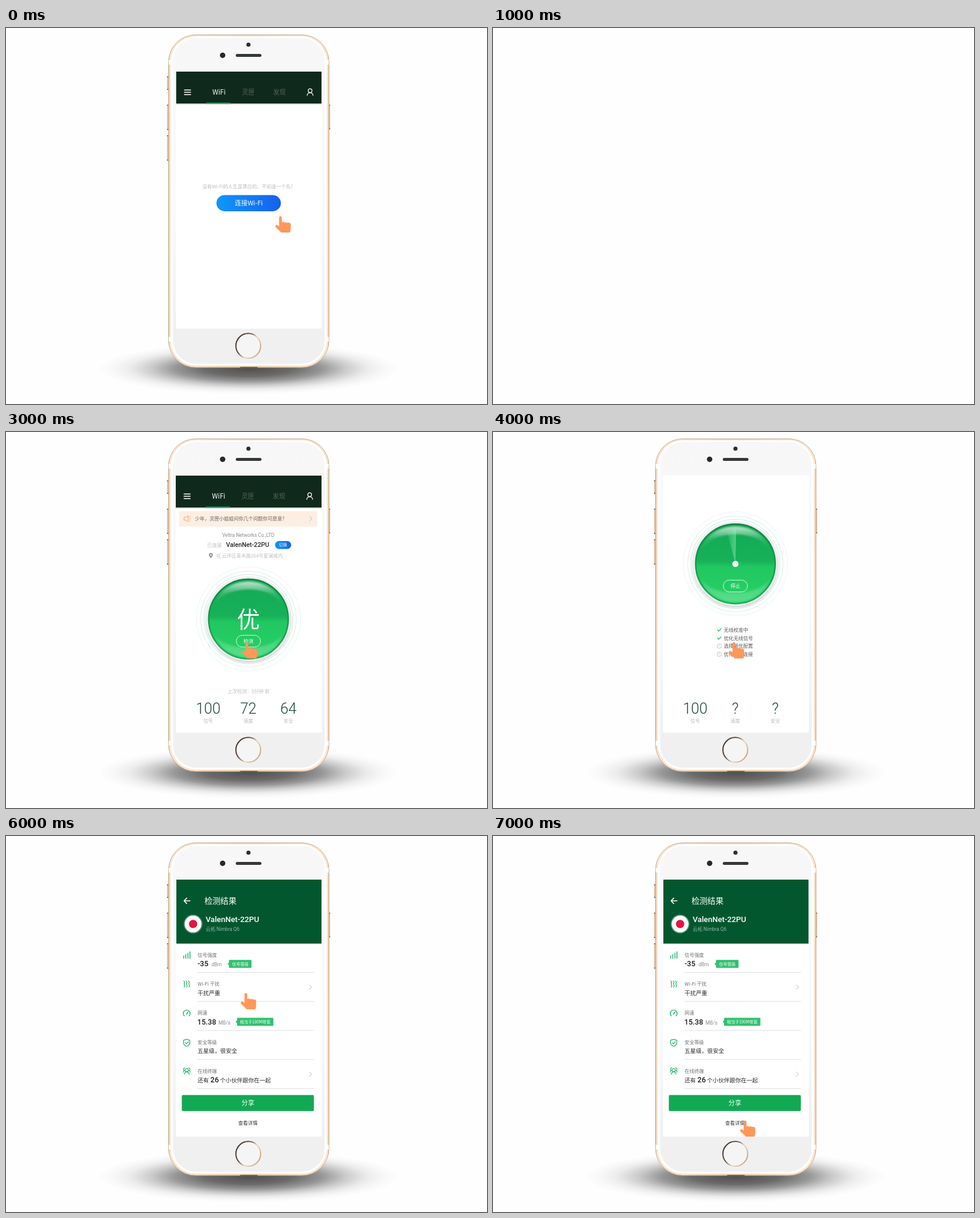
An HTML page that plays this animation: 816 by 638 pixels, repeating every 8 s.

```html
<!DOCTYPE html>
<html lang="zh-CN">
<head>
<meta charset="utf-8">
<title>Wi-Fi 检测</title>
<style>
html, body { margin: 0; width: 100%; height: 100%; overflow: hidden; background: #fefefe; }
svg { display: block; width: 100%; height: 100%; }
text { font-family: "Noto Sans CJK SC", "Noto Sans CJK", "Noto Sans", sans-serif; white-space: pre; }
.r { font-family: Roboto, "Noto Sans CJK SC", "Noto Sans CJK", sans-serif; }
.line { fill: none; stroke-linecap: round; stroke-linejoin: round; }
</style>
</head>
<body>
<svg id="stage" viewBox="0 0 816 638" xmlns="http://www.w3.org/2000/svg"></svg>
<script>
const stage = document.getElementById('stage');

const text = (x, y, size, fill, str, extra = '') =>
  `<text x="${x}" y="${y}" font-size="${size}" fill="${fill}" ${extra}>${str}</text>`;
const mid = (x, y, size, fill, str, extra = '') =>
  text(x, y, size, fill, str, 'text-anchor="middle" ' + extra);
const rect = (x, y, w, h, fill, r = 0, extra = '') =>
  `<rect x="${x}" y="${y}" width="${w}" height="${h}" rx="${r}" fill="${fill}" ${extra}/>`;
const circle = (x, y, r, fill, extra = '') =>
  `<circle cx="${x}" cy="${y}" r="${r}" fill="${fill}" ${extra}/>`;
const line = (d, color, w = 1, extra = '') =>
  `<path class="line" d="${d}" stroke="${color}" stroke-width="${w}" ${extra}/>`;
const chevron = (x, y) => line(`M${x - 1.8} ${y - 3.7}l3.7 3.7l-3.7 3.7`, '#b5b5b5', 1);
const grad = (id, dir, ...stops) => {
  const s = stops.map(([o, c, a = 1]) => `<stop offset="${o}" stop-color="${c}" stop-opacity="${a}"/>`).join('');
  const tag = dir === 'radial' ? 'radialGradient' : 'linearGradient';
  return `<${tag} id="${id}" ${dir === 'radial' ? '' : dir}>${s}</${tag}>`;
};
const ROBOTO = 'class="r"', MEDIUM = 'class="r" font-weight="500"', LIGHT = 'class="r" font-weight="300"';
const DOWN = 'x1="0" y1="0" x2="0" y2="1"', ACROSS = 'x1="0" y1="0" x2="1" y2="0"';
const SSID = 'ValenNet-22PU', GREEN = '#22b865', PALE = '#bdbdbd';

const defs = `<defs>
  ${grad('shadow', 'radial', [0, '#333', .86], [.3, '#3c3c3c', .76], [.5, '#484848', .56], [.65, '#555', .31], [.8, '#666', .12], [.92, '#777', .04], [1, '#888', .01])}
  ${grad('gold', ACROSS, [0, '#d5b291'], [.008, '#fbe6d2'], [.5, '#f0d2b3'], [.992, '#fbe6d2'], [1, '#d5b291'])}
  ${grad('face', DOWN, [0, '#f7f7f7'], [.5, '#fafafa'], [.88, '#f0f0f0'], [1, '#f0f0f0'])}
  ${grad('ring', 'x1="0" y1=".1" x2="1" y2=".7"', [0, '#3b2d27'], [.4, '#6b5446'], [.65, '#efd8c3'], [1, '#c9a17f'])}
  ${grad('blue', ACROSS, [0, '#0f97f7'], [.55, '#137af2'], [1, '#1560ee'])}
  ${grad('disc', DOWN, [0, '#12a350'], [.2, '#14ad56'], [.46, '#16b158'], [.54, '#21c861'], [1, '#28d066'])}
  ${grad('gloss', DOWN, [0, '#fff', .72], [.5, '#fff', .14], [1, '#fff', 0])}
  ${grad('glow', DOWN, [0, '#fff', 0], [1, '#8df0ae', .45])}
  ${grad('edge', DOWN, [0, '#0b8440'], [.5, '#109a4c'], [1, '#16ad55'])}
  ${grad('sweep', ACROSS, [0, '#7fe3a4', .12], [1, '#9cf0bb', .5])}
  <filter id="soft" x="-20%" y="-20%" width="140%" height="140%"><feGaussianBlur stdDeviation="1.6"/></filter>
  <clipPath id="glass"><rect x="288" y="74" width="248" height="436"/></clipPath>
</defs>`;

const side = (x, y, h) => rect(x, y, 2.6, h, '#dcc4ad', 1) +
  rect(x, y, 2.6, 1.6, '#6b5a4d') + rect(x, y + h - 1.6, 2.6, 1.6, '#6b5a4d');

const phone = `
  <ellipse cx="411.5" cy="578" rx="252" ry="43" fill="url(#shadow)"/>
  ${side(273.2, 82, 23)}${side(273.2, 130, 43)}${side(273.2, 182, 43)}${side(547.4, 130, 42)}
  ${rect(275.7, 11.5, 272.3, 564.5, 'url(#gold)', 46, 'stroke="#c9a684" stroke-width=".9"')}
  ${[54, 524].map(y => rect(276, y, 4, 8, '#fafafa') + rect(543.6, y, 4, 8, '#fafafa')).join('')}
  ${rect(279.5, 14, 264.7, 559, '#fefefe', 43)}
  ${rect(283.5, 17, 257, 552.5, 'url(#face)', 39)}
  ${rect(397, 575, 30, 1.8, '#6d5a4c', 1)}
  ${circle(411.3, 28.2, 3.5, '#2b302c')}${circle(367.5, 46.3, 4.6, '#252b27')}
  ${rect(389.8, 44, 43.6, 5, '#343936', 2.5)}
  ${circle(411, 539.3, 21, '#f5f5f5', 'stroke="url(#ring)" stroke-width="2"')}
  ${rect(288, 74, 248, 436, '#fff')}`;

const header = x => rect(x, 74, 535.3 - x, 54.3, '#10291d') +
  rect(x, 128.3, 535.3 - x, 1.4, '#c9cfcc') + rect(x + 51, 126.4, 41, 2, '#138a4f') +
  line(`M${x + 14} 105.2h10.5m-10.5 3.9h10.5m-10.5 3.9h10.5`, '#fff', 1.5) +
  mid(x + 72.8, 112.7, 11.3, '#fff', 'WiFi') +
  mid(x + 122.3, 112.7, 10.8, '#52635a', '灵匣') + mid(x + 175, 112.7, 10.8, '#52635a', '发现') +
  circle(x + 227.2, 106.3, 3.2, 'none', 'stroke="#fff" stroke-width="1.3"') +
  line(`M${x + 222.3} 114.3c0-6 9.8-6 9.8 0`, '#fff', 1.3);

const score = (x, val, label) => mid(x, 478, 25, '#174a35', val, LIGHT) + mid(x, 493.2, 8.1, PALE, label);
const scores = (a, b, c) => score(343, a, '信号') + score(411, b, '速度') + score(479, c, '安全');

// Glossy round button, centred on y, with a label pill below the middle
const dial = (y, label, inner) => `<g transform="translate(411.3 ${y})">
  ${[[88.3, '#e4f6ec'], [81, '#d3f0df'], [75.6, '#c9e9d6']].map(([r, c]) => circle(0, 0, r, 'none', `stroke="${c}" stroke-width=".9"`)).join('')}
  ${circle(0, 1.5, 72.5, '#cfd3d1', 'filter="url(#soft)"')}${circle(0, 0, 71.8, '#eef0ef')}
  ${circle(0, 0, 67.5, 'url(#disc)', 'stroke="url(#edge)" stroke-width="2.4"')}
  <path d="M-57-23C-47-77 47-77 57-23C42-59-42-59-57-23Z" fill="url(#gloss)" filter="url(#soft)"/>
  <path d="M-60 22C-44 79 44 79 60 22C43 58-43 58-60 22Z" fill="url(#glow)" filter="url(#soft)"/>
  ${inner}
  ${rect(-20.6, 27.6, 41, 20, 'none', 10, 'stroke="#d9f8e4" stroke-width="1"')}
  ${mid(0, 40.7, 8.3, '#fff', label)}</g>`;

const connect = header(288.7) +
  text(333, 271.5, 8.2, '#bcbcbc', '没有Wi-Fi的人生是黑白的，不如连一个先?') +
  rect(357, 283.4, 109.3, 27.5, 'url(#blue)', 13.75) +
  mid(411.7, 301.2, 11, '#fff', '连接Wi-Fi');

const home = header(288) +
  rect(293.8, 134.2, 234.6, 26.4, '#fdeee3', 2) +
  line('M302.3 145h2.6l4-3v10.4l-4-3h-2.6zM311.2 144l1.3-.8M311.4 147.2h1.6M311.2 150.4l1.3.8', '#f5a261', 1) +
  text(320.5, 150.2, 8.23, '#6c625c', '少年，灵匣小姐姐问你几个问题你可愿意?') + chevron(517.2, 147.2) +
  mid(411, 177.8, 8.3, '#8b8b8b', 'Veltra Networks Co.,LTD', ROBOTO) +
  text(341.3, 194.7, 8.2, PALE, '已连接') +
  text(373.3, 195.4, 10.7, '#262626', SSID, MEDIUM) +
  rect(456.4, 185, 27.4, 13.6, 'url(#blue)', 6.8) + mid(470, 194.3, 6.9, '#fff', '切换') +
  `<path d="M347.5 214.5C345 211 344.1 210 344.1 208.6A3.4 3.4 0 0 1 350.9 208.6C350.9 210 350 211 347.5 214.5Z" fill="#999"/>` +
  circle(347.5, 208.7, 1.2, '#fff') +
  text(356.5, 213.4, 8.13, PALE, '在 云坪区青禾路264号星澜城内') +
  dial(317.3, '检测', mid(0, 14.5, 39, '#fff', '优', 'font-weight="300"')) +
  text(376, 443.2, 8.1, PALE, '上次检测：5分钟 前') +
  scores('100', '72', '64');

const tick = y => line(`M380.9 ${y}l2 2l3.9-4`, '#28c268', 1.4);
const clock = y => circle(383.8, y, 3.8, 'none', 'stroke="#bfbfbf" stroke-width=".9"') +
  line(`M383.6 ${y - 2}v2.2l1.6 1`, '#bfbfbf', .8);

const scan = dial(223.7, '停止',
    '<path d="M0 0L-14.5-56Q-7-59.5 1-59.5Z" fill="url(#sweep)"/>' + circle(0, 0, 5.3, '#fff')) +
  ['无线校准中', '优化无线信号', '选择最优配置', '优化网络连接'].map((s, i) => {
    const y = 336 + i * 13.65;
    return (i < 2 ? tick(y) : clock(y)) + text(391.5, y + 3, 8.25, '#565656', s);
  }).join('') + scores('100', '?', '?');

const tag = (x, y, w, s) => rect(x, y, w, 13.4, '#2fc16d', 1) +
  `<path d="M${x + .5} ${y + 4}l-3 2.7l3 2.7z" fill="#2fc16d"/>` + mid(x + w / 2, y + 9.3, 6.95, '#fff', s);
const unit = (x, y, s) => text(x, y, 8.4, '#8d8d8d', s, ROBOTO);
const word = (x, y, s) => text(x, y, 9.6, '#2a2a2a', s);
const num = (x, y, s) => text(x, y, 12.5, '#1c1c1c', s, MEDIUM);

const icons =
  line('M301.5 207.5v-4M305 207.5v-6.5M308.6 207.5v-8.7M312.1 207.5v-11', GREEN, 1.5) +
  [301.6, 305.6, 309.6].map(x => line(`M${x} 246c3.6 2.4-.6 3.6 1 6c1 1.6 1.4 2.6-.2 4.4`, GREEN, 1.3)).join('') +
  line('M302.4 305.3A5.8 5.8 0 1 1 310.6 305.3M306.2 302.5l2.6-4', GREEN, 1.4) +
  line('M306.5 344.8l5.3 1.8v4.2c0 3.3-3 5.2-5.3 6.2c-2.3-1-5.3-2.9-5.3-6.2v-4.2zM304 350.6l2 2l3.4-3.6', GREEN, 1.3) +
  line('M302.6 404.2c.2-5.2 7.8-5.2 8 0M303.4 393.3c-3.4.6-2.4 4.4-.8 4.6c-1.2.4-1.8 1.6-1.8 3M309.8 393.3c3.4.6 2.4 4.4.8 4.6c1.2.4 1.8 1.6 1.8 3', GREEN, 1.2) +
  circle(306.6, 397.3, 2.8, 'none', `stroke="${GREEN}" stroke-width="1.2"`);

const result = rect(289, 74, 246.3, 108.6, '#02572f') +
  line('M312.2 110h-10.2m4.6-4.6l-4.6 4.6l4.6 4.6', '#fff', 1.5) +
  text(336.7, 114.8, 13.6, '#fff', '检测结果') +
  circle(317.4, 149.3, 15.2, '#fff', 'stroke="#4a8a68" stroke-width="1.8"') + circle(317.4, 149.3, 7, '#e2173f') +
  text(338.7, 146.2, 13.25, '#fff', SSID, MEDIUM) +
  text(338.7, 161.2, 8.2, '#93b8a4', '云拓 Nimbra Q6', ROBOTO) +
  ['信号强度', 'Wi-Fi 干扰', '网速', '安全等级', '在线终端'].map((s, i) => {
    const y = i * 49.25;
    return text(325, 204.8 + y, 8.2, '#707070', s) + rect(325, 231 + y, 197.5, .9, '#dcdcdc');
  }).join('') + icons +
  num(325, 221.3, '-35') + unit(348.8, 221.3, 'dBm') + tag(378.3, 210.3, 38.2, '信号很强') +
  word(325, 269.8, '干扰严重') + chevron(516.5, 256.5) +
  num(324.6, 319.6, '15.38') + unit(360.5, 319.6, 'MB/s') + tag(392, 308.6, 61.6, '相当于100M带宽') +
  word(325, 368.2, '五星级，很安全') +
  word(325, 417.8, '还有') + num(346.8, 418.2, '26') + word(363, 417.8, '个小伙伴跟你在一起') + chevron(516.5, 404) +
  rect(298.3, 439.4, 224, 27.4, '#12a954', 2) + mid(410.4, 457, 10.8, '#fff', '分享') +
  mid(410.5, 489.8, 8.2, '#333', '查看详情');

const hand = '<path d="M6.3 2.2C6.3-.6 10.9-.6 10.9 2.2V10.2C11.6 9.2 15 9.4 15.6 10.8C17 9.8 20 10 20.6 11.2C22.5 10.4 26 10.8 26 13.5V22L24.8 27.6H9.3C8.6 24.6 3.5 22 .6 18.4C-.8 16 1.6 13.8 3.8 15.2L6.3 17Z" fill="#ff9859"/>';

const screens = { connect, home, scan, result };
stage.innerHTML = defs + `<g id="phone">${phone}<g clip-path="url(#glass)">` +
  Object.entries(screens).map(([id, body]) => `<g id="${id}">${body}</g>`).join('') +
  `<g id="hand">${hand}</g></g></g>`;

// One step per second: screen, then the hand's top left corner
const steps = [
  ['connect', 457, 319.5], null, ['home', 428, 294], ['home', 400, 356.7],
  ['scan', 400, 356.7], ['scan', 403.3, 262.4], ['result', 398.3, 266.3], ['result', 419, 482.7]
];
const node = id => document.getElementById(id);
const show = (id, on) => node(id).style.display = on ? '' : 'none';
let shown = -1;

function draw(ms) {
  const i = Math.floor(ms / 1000) % steps.length;
  if (i !== shown) {
    const step = steps[shown = i];
    show('phone', step);
    if (step) {
      const [name, x, y] = step;
      for (const id in screens) show(id, id === name);
      node('hand').setAttribute('transform', `translate(${x} ${y})`);
    }
  }
}
function loop() {
  draw(performance.now());
  requestAnimationFrame(loop);
}
loop();
</script>
</body>
</html>
```
